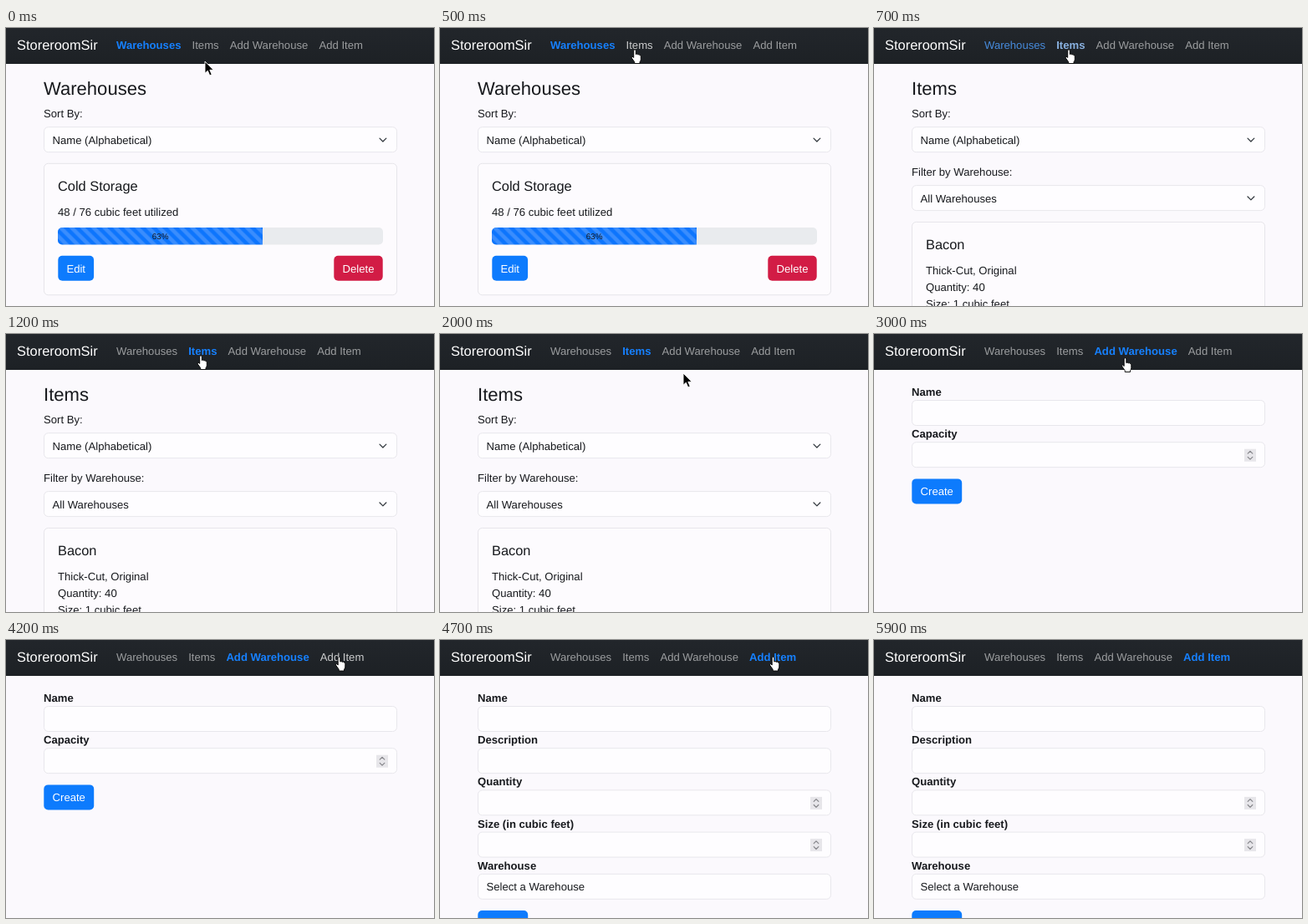
Write an HTML page that moves like this. It is 512 px wide and 333 px high and loops after 6000 ms.

```html
<!DOCTYPE html>
<html lang="en">
<head>
<meta charset="utf-8">
<title>Warehouse manager</title>
<style>
  html, body { margin: 0; width: 100%; height: 100%; overflow: hidden; background: #fbf9fd; }
  svg { display: block; width: 100vw; height: 100vh; }
  text { font: 13.12px "Liberation Sans", Arial, sans-serif; fill: #17191d; white-space: pre; text-rendering: geometricPrecision; }
  .h3 { font-size: 22.05px; }
  .h5, .brand { font-size: 16.4px; }
  .brand { fill: #fff; }
  .small { font-size: 9.84px; }
  .bold { font-weight: 700; }
  .white { fill: #fff; }
  .field { fill: #fefdff; stroke: #e8e7ec; }
  .card { fill: #fdfbfe; stroke: #e6e5ea; }
  .line { fill: none; stroke: #343a40; stroke-width: 1.3; stroke-linecap: round; stroke-linejoin: round; }
  .spin { stroke: #85858a; stroke-width: 1.2; }
</style>
</head>
<body>
<svg viewBox="0 0 512 333" preserveAspectRatio="none">
  <defs>
    <pattern id="stripes" width="13.12" height="13.12" x="62" y="239" patternUnits="userSpaceOnUse">
      <path fill="#0d75fd" d="M0 0h13.12v13.12H0z"/>
      <path fill="#3a8dfd" d="M0 0H6.56L13.12 6.56V13.12zM0 6.56L6.56 13.12H0z"/>
    </pattern>
    <linearGradient id="bar" x2="0" y2="1">
      <stop stop-color="#22262b"/><stop offset="1" stop-color="#1d2125"/>
    </linearGradient>
  </defs>
  <rect width="512" height="333" fill="#fbf9fd"/>
  <g id="pages"></g>
  <rect width="512" height="43" fill="url(#bar)"/>
  <text class="brand" x="13.1" y="26">StoreroomSir</text>
  <text id="nav" y="25"></text>
  <g id="cursor">
    <path id="arrow" fill="#000" stroke="#fff" stroke-width=".9"
      d="M0 0V14.2L3.3 11.2L5.7 16.8L8.2 15.7L5.8 10.3H10.2Z"/>
    <path id="hand" fill="#fff" stroke="#000" stroke-width=".9" stroke-linejoin="round"
      d="M-1.3 1.2Q0 -.8 1.3 1.2V6Q2.8 5 3.8 6.4Q5.2 5.6 5.9 7Q7.3 6.6 7.3 8.4V12Q7.2 14 6 15.2V17H-.3V15.2L-3.6 10.6Q-4.6 8.8 -3 8.6L-1.3 10Z"/>
  </g>
</svg>
<script>
const $ = id => document.getElementById(id);
const LOOP = 6000, STEP = 100, FADE = 150;

// Page building blocks
const text = (x, y, s, cls = '', extra = '') => `<text x="${x}" y="${y}" class="${cls}" ${extra}>${s}</text>`;
const box = (x, y, w, h, attrs) => `<rect x="${x}" y="${y}" width="${w}" height="${h}" rx="5" ${attrs}/>`;
const field = y => box(45.5, y, 422, 30, 'class="field"');
const card = (y, h) => box(45.5, y, 422, h, 'class="card"');
const label = (y, s) => text(45, y, s, 'bold');
const select = (y, s) => field(y) + text(55.5, y + 20, s) +
  `<path class="line" d="M447 ${y + 13.4}l3.9 3.9 3.9-3.9"/>`;
const spinner = y => `<rect x="443" y="${y + 8}" width="14" height="15" fill="#e7e6ea"/>` +
  `<path class="line spin" d="M447.2 ${y + 13.5}l2.8-2.8 2.8 2.8M447.2 ${y + 17.6}l2.8 2.8 2.8-2.8"/>`;
const button = (x, y, w, s, color = '#0d7bfd') => box(x, y, w, 30, `fill="${color}"`) +
  text(x + w / 2, y + 19.9, s, 'white', 'text-anchor="middle"');
const heading = s => text(45, 80, s, 'h3') + text(45, 107, 'Sort By:') + select(118.7, 'Name (Alphabetical)');

const pages = [
  heading('Warehouses') + card(162.3, 157.5) +
    text(62, 195, 'Cold Storage', 'h5') + text(62, 225, '48 / 76 cubic feet utilized') +
    box(62, 239, 389, 20.5, 'fill="#e9ebee"') +
    '<path fill="url(#stripes)" d="M307 239V259.5H67a5 5 0 0 1-5-5V244a5 5 0 0 1 5-5z"/>' +
    text(184.6, 252.6, '63%', 'small', 'text-anchor="middle"') +
    button(62.3, 272.8, 42.8, 'Edit') + button(392.3, 272.8, 58.4, 'Delete', '#d21c45'),

  heading('Items') + text(45, 177, 'Filter by Warehouse:') + select(188.6, 'All Warehouses') +
    card(232.4, 120) + text(62, 264.7, 'Bacon', 'h5') +
    ['Thick-Cut, Original', 'Quantity: 40', 'Size: 1 cubic feet']
      .map((s, i) => text(62, 295.2 + i * 19.68, s)).join(''),

  label(74, 'Name') + field(79.5) + label(124.2, 'Capacity') + field(129.7) + spinner(129.7) +
    button(45.3, 173.4, 59.9, 'Create'),

  ['Name', 'Description', 'Quantity', 'Size (in cubic feet)', 'Warehouse']
    .map((s, i) => label(74 + i * 50.2, s) + field(79.5 + i * 50.2)).join('') +
    spinner(179.9) + spinner(230.1) + text(55.5, 300.2, 'Select a Warehouse') + button(45.3, 324, 59.9, 'Create')
];
$('pages').innerHTML = pages.map(p => `<g>${p}</g>`).join('');
$('nav').innerHTML = ['Warehouses', 'Items', 'Add Warehouse', 'Add Item']
  .map((s, i) => `<tspan ${i ? 'dx="13.12"' : 'x="132"'}>${s}</tspan>`).join('');
const groups = [...$('pages').children], links = [...$('nav').children];

// time, active link, hovered link
const states = [
  [0, 0, -1], [300, 0, 1], [645, 1, 1], [1400, 1, -1], [2300, 1, 2],
  [2600, 2, 2], [3700, 2, 3], [4500, 3, 3], [5200, 3, -1]
];
// time, x, y
const path = [
  [0, 238, 40], [100, 238, 40], [500, 233, 25.5], [1200, 233, 25.5], [1700, 282, 46], [2000, 291, 47],
  [2400, 300.5, 28.5], [3200, 300.5, 28.5], [4000, 398.5, 20], [6000, 398.5, 20]
];
const HIDE = 5200;
const GREY = [155, 157, 159], LIGHT = [204, 205, 206], BLUE = [22, 128, 255];

const mix = (a, b, k) => a + (b - a) * k;
const smooth = k => k * k * (3 - 2 * k);
const tint = (i, [, active, hover]) => i === active ? BLUE : i === hover ? LIGHT : GREY;

function cursorAt(t) {
  const n = path.findIndex(p => p[0] > t), a = path[n - 1], b = path[n];
  const k = smooth((t - a[0]) / (b[0] - a[0]));
  return [mix(a[1], b[1], k), mix(a[2], b[2], k)];
}

function draw(t) {
  const n = states.findLastIndex(s => s[0] <= t);
  const now = states[n], before = states[Math.max(0, n - 1)];
  const k = Math.min(1, (t - now[0]) / FADE);
  groups.forEach((g, i) => g.style.display = i === now[1] ? '' : 'none');
  links.forEach((a, i) => {
    const from = tint(i, before), to = tint(i, now);
    a.style.fill = `rgb(${from.map((c, j) => Math.round(mix(c, to[j], k)))})`;
    a.style.fontWeight = i === now[1] ? 700 : 400;
  });
  const [x, y] = cursorAt(t), over = y < 37;
  $('cursor').setAttribute('transform', `translate(${x} ${y})`);
  $('cursor').style.display = t < HIDE ? '' : 'none';
  $('hand').style.display = over ? '' : 'none';
  $('arrow').style.display = over ? 'none' : '';
}

const start = performance.now();
function tick() {
  const t = (performance.now() - start) % LOOP;
  draw(Math.floor(t / STEP) * STEP);
  requestAnimationFrame(tick);
}
tick();
</script>
</body>
</html>
```
